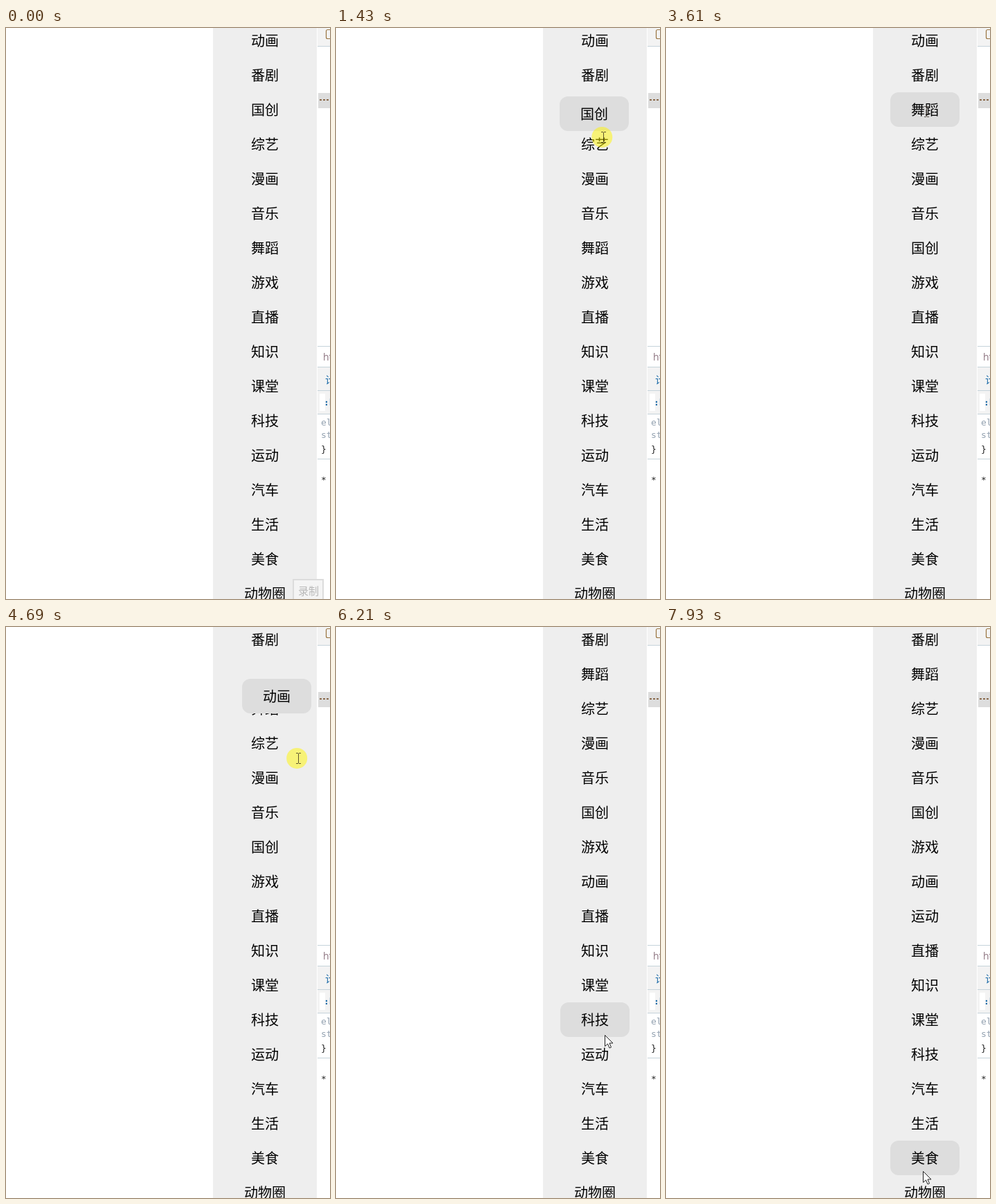
An HTML page with a canvas for the animation above (8 s loop, 468 by 826 pixels).

```html
<!DOCTYPE html>
<html lang="zh-CN">
<head>
<meta charset="utf-8">
<title>拖拽排序</title>
<style>
  html, body { margin: 0; width: 100%; height: 100%; overflow: hidden; background: #fff; }
  canvas { display: block; }
</style>
</head>
<body>
<canvas id="stage" width="468" height="826"></canvas>
<script>
const ctx = document.getElementById('stage').getContext('2d');
const LOOP = 8000;
const LAG = 70;    // the dragged box trails the mouse
const HOLD = 130;  // the button is pressed this long before a drag moves
const LEFT = 324, TOP = -7, WIDTH = 100, ROW = 50;
const CJK = '"Noto Sans CJK SC", "Noto Sans CJK", sans-serif';
const MONO = '"DejaVu Sans Mono", monospace';
const LABELS = '动画 番剧 国创 综艺 漫画 音乐 舞蹈 游戏 直播 知识 课堂 科技 运动 汽车 生活 美食 动物圈'.split(' ');

// Mouse moves to x, y between start and end; a drag also has the time of its drop
const ENTRY = [402, 860];
const MOVES = [
  { start: 70, end: 830, x: 388, y: 132 },
  { start: 890, end: 960, x: 390, y: 115 },
  { start: 1350, end: 2170, x: 390, y: 275, bow: -5, drop: 2170 },
  { start: 2370, end: 2650, x: 368, y: 335 },
  { start: 2930, end: 3280, x: 376, y: 121, drop: 3610 },
  { start: 3610, end: 4290, x: 390, y: 15 },
  { start: 4571, end: 5225, x: 428, y: 399, bow: 15, drop: 5720 },
  { start: 5450, end: 5570, x: 399, y: 394 },
  { start: 5720, end: 6210, x: 388, y: 590 },
  { start: 6280, end: 6380, x: 376, y: 628 },
  { start: 6510, end: 6770, x: 377, y: 416, drop: 6970 },
  { start: 6970, end: 7720, x: 374, y: 736 },
  { start: 7790, end: 7930, x: 371, y: 787 }
];
const DRAGS = MOVES.filter(move => move.drop);

const easeOut = k => 1 - (1 - k) ** 3;
const rowTop = row => TOP + row * ROW;
const rowAt = y => Math.floor((y - TOP) / ROW);

function mouseAt(t) {
  let [x, y] = ENTRY;
  for (const move of MOVES) {
    if (t < move.start) break;
    const k = easeOut(Math.min(1, (t - move.start) / (move.end - move.start)));
    x += (move.x - x) * k + (move.bow || 0) * Math.sin(Math.PI * k);
    y += (move.y - y) * k;
  }
  return [x, y];
}

function dragState(drag, t) {
  const [px, py] = mouseAt(drag.start);
  const [x, y] = mouseAt(Math.max(drag.start, t - LAG));
  const from = rowAt(py);
  const dy = y - py;
  const shift = Math.trunc(dy / ROW);
  return { from, to: from + shift, x: Math.round(LEFT + x - px), y: Math.round(rowTop(from) + dy) };
}

function reorder(list, { from, to }) {
  list.splice(to, 0, list.splice(from, 1)[0]);
}

function rect(x, y, w, h, color) {
  ctx.fillStyle = color;
  ctx.fillRect(x, y, w, h);
}

function text(str, x, y, font, color, align = 'left') {
  ctx.font = font;
  ctx.fillStyle = color;
  ctx.textAlign = align;
  ctx.fillText(str, x, y);
}

function box(x, y) {
  ctx.fillStyle = '#ddd';
  ctx.beginPath();
  ctx.roundRect(x, y, WIDTH, ROW, 12);
  ctx.fill();
}

function label(str, x, y) {
  text(str, x + WIDTH / 2, y + 33, '300 20px ' + CJK, '#000', 'center');
}

function drawInspector() {
  rect(449, 0, 19, 826, '#fff');
  rect(450, 0, 18, 26, '#f3f3f3');
  rect(450, 491, 18, 67, '#f3f3f3');
  rect(453, 529, 8, 25, '#fff');
  for (const y of [26, 460, 490, 524, 558, 623]) rect(450, y, 18, 1, '#c6d3da');
  ctx.strokeStyle = '#9a7440';
  ctx.lineWidth = 1.2;
  ctx.beginPath();
  ctx.roundRect(462.5, 2.5, 12, 13, 2);
  ctx.stroke();
  rect(451, 94, 17, 22, '#ddd');
  for (let i = 0; i < 3; i++) rect(453 + i * 5, 103, 3, 2, '#8a6a4c');
  text('html', 458, 481, '14px "Open Sans", sans-serif', '#8d7480');
  text('计', 461, 514, '14px ' + CJK, '#1a6aa8');
  text(':hov', 459, 546, 'bold 13px ' + MONO, '#1a6aa8');
  text('element', 455, 575, '13px ' + MONO, '#93a1b0');
  text('style', 455, 593, '13px ' + MONO, '#93a1b0');
  text('}', 455, 614, '13px ' + MONO, '#222');
  text('*', 455, 658, '13px ' + MONO, '#222');
}

function drawTooltip() {
  rect(414, 797, 45, 29, '#dcdcdc');
  rect(416, 799, 41, 27, '#f4f4f4');
  text('录制', 422, 820, '300 15px ' + CJK, '#b8b8b8');
}

function drawArrow(x, y) {
  const outline = [[0, 0], [0, 16], [4, 12.5], [6.5, 18.5], [9, 17.5], [6.5, 11.5], [11.5, 11.5]];
  ctx.beginPath();
  for (const [dx, dy] of outline) ctx.lineTo(x + dx + 0.5, y + dy + 0.5);
  ctx.closePath();
  ctx.fillStyle = '#fff';
  ctx.fill();
  ctx.strokeStyle = '#222';
  ctx.lineWidth = 1;
  ctx.stroke();
}

function drawBeam(x, y) {
  x = Math.round(x);
  y = Math.round(y);
  const color = 'rgba(40,30,20,.75)';
  rect(x, y - 7, 1, 14, color);
  for (const edge of [y - 8, y + 7]) {
    rect(x - 3, edge, 3, 1, color);
    rect(x + 1, edge, 3, 1, color);
  }
}

function drawHighlight(x, y) {
  ctx.fillStyle = 'rgba(255,246,0,.5)';
  ctx.beginPath();
  ctx.arc(x - 2, y, 15, 0, Math.PI * 2);
  ctx.fill();
}

function overText(list, [x, y]) {
  const row = rowAt(y);
  const halfWidth = (list[row] || '').length * 10;
  return Math.abs(x - LEFT - WIDTH / 2) < halfWidth && Math.abs(y - rowTop(row) - 26) < 13;
}

function draw(t) {
  const list = LABELS.slice();
  const mouse = mouseAt(t);
  for (const drag of DRAGS) if (t >= drag.drop) reorder(list, dragState(drag, drag.drop));

  const active = DRAGS.find(drag => t >= drag.start - HOLD && t < drag.drop);
  const ghost = active && dragState(active, t);
  const beam = overText(list, active ? mouseAt(active.start) : mouse);
  const hover = active ? -1 : rowAt(mouse[1]);
  if (ghost) reorder(list, ghost);

  rect(0, 0, 468, 826, '#fff');
  rect(299, 0, 150, 826, '#eee');
  drawInspector();
  list.forEach((str, row) => {
    if (ghost && row === ghost.to) return;
    if (row === hover) box(LEFT, rowTop(row));
    label(str, LEFT, rowTop(row));
  });
  if (t < 70) drawTooltip();
  if (ghost) {
    box(ghost.x, ghost.y);
    label(list[ghost.to], ghost.x, ghost.y);
    drawHighlight(...mouse);
  }
  (beam ? drawBeam : drawArrow)(...mouse);
}

const begin = performance.now();
function frame() {
  draw((performance.now() - begin) % LOOP);
  requestAnimationFrame(frame);
}
frame();
</script>
</body>
</html>
```
